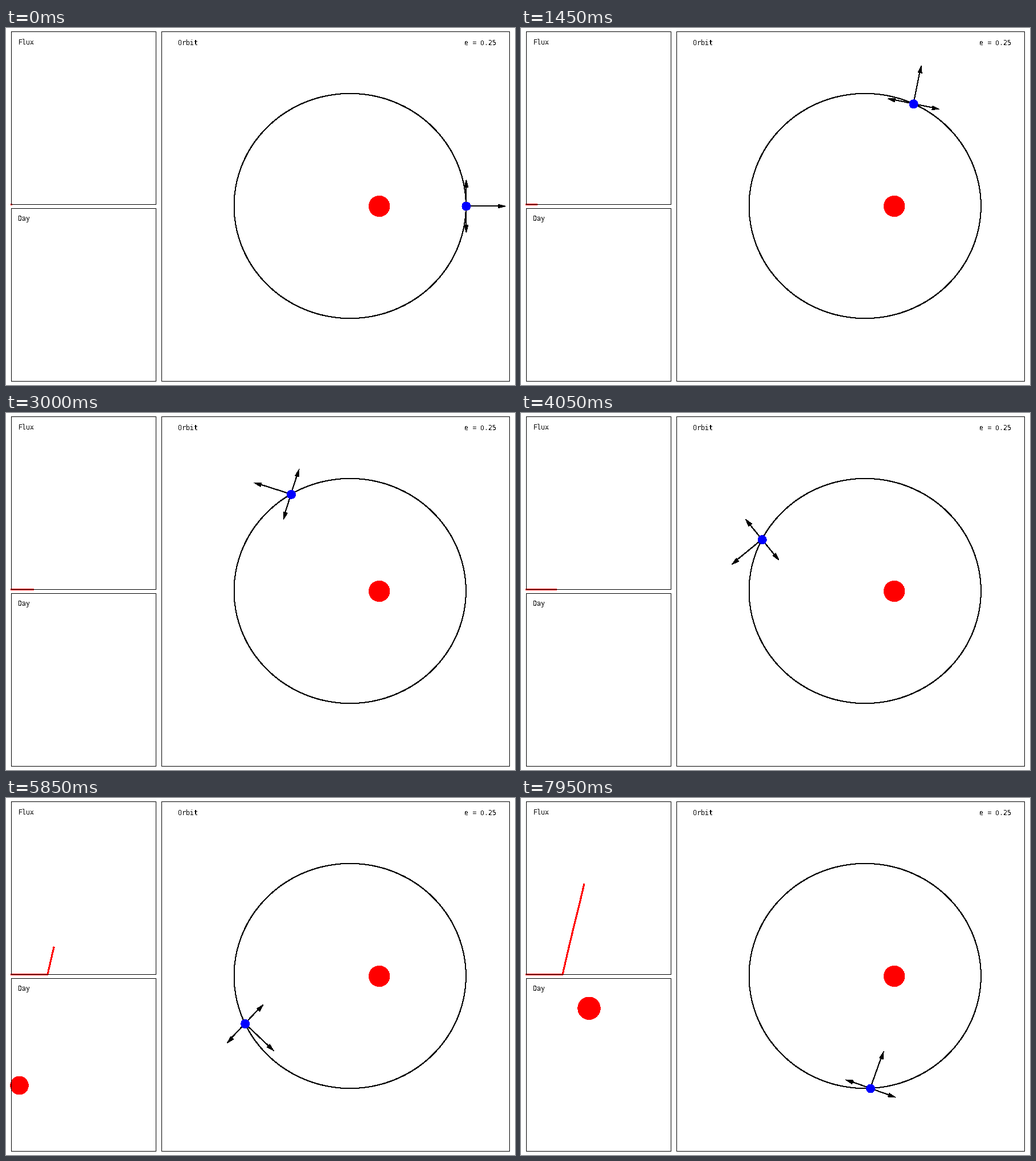
These frames come from a looping animation (894 by 626 pixels, 8 s). A matplotlib script:

```python
import numpy as np
import matplotlib.pyplot as plt
from matplotlib.animation import FuncAnimation
from matplotlib.patches import Circle, Polygon, Rectangle

W, H, DPI = 894, 626, 100
FRAMES, STEP_MS = 160, 50
PX = 72 / DPI                       # points per pixel

ECC = 0.25
RATE = 4 * np.pi / 399              # mean anomaly per frame
SPIN = 1.5                          # spin turns per orbit
A = 203.67                          # semi-major axis in pixels
B = A * np.sqrt(1 - ECC ** 2)
CX, CY = 604.7, 312.5
STAR_X = CX + A * ECC
LONG, SHORT = 0.34 * A, 0.23 * A
PEN = 0.5                           # two-pixel strokes sit up and left by this

FLUX_X, FLUX_Y, FLUX_STEP, FLUX_SCALE = 9.5, 309.5, 254 / 399, 156
DAY_X, DAY_Y, DAY_W, DAY_H = 136.5, 619.5, 127, 253

plt.rcParams["path.simplify"] = False
plt.rcParams["text.antialiased"] = False

fig = plt.figure(figsize=(W / DPI, H / DPI), dpi=DPI, facecolor="white")
ax = fig.add_axes([0, 0, 1, 1])
ax.set_xlim(0, W)
ax.set_ylim(H, 0)
ax.axis("off")


def panel(x0, y0, x1, y1):
    ax.add_patch(Rectangle((x0, y0), x1 - x0, y1 - y0, fill=False, ec="black",
                           lw=PX, aa=False, snap=True, zorder=8))


def label(x, base, text, family="DejaVu Sans Mono", size=11.63):
    ax.text(x, base, text, family=family, size=size * PX,
            va="baseline", zorder=9)


# Without antialiasing every touched pixel is painted, so strokes come out
# about one pixel wider and discs half a pixel larger than their nominal size.
def disc(x, y, r, color, z):
    return ax.add_patch(Circle((x, y), r - 0.5, fc=color, lw=0, aa=False,
                               zorder=z))


def line(color, width, z, **kw):
    return ax.plot([], [], color=color, lw=(width - 1) * PX, aa=False,
                   snap=False, zorder=z, **kw)[0]


class Arrow:
    def __init__(self):
        self.shaft = line("black", 2, 4)
        self.head = ax.add_patch(Polygon(np.zeros((3, 2)), fc="black", lw=0,
                                         aa=False, snap=False, zorder=4))

    def point(self, x, y, angle, length):
        u = np.array([np.cos(angle), -np.sin(angle)])
        n = np.array([-u[1], u[0]])
        start = np.array([x, y])
        tip = start + (length - 0.6) * u
        back = tip - 12.8 * u
        self.shaft.set_data(*(np.transpose([start, back]) - PEN))
        self.head.set_xy([tip, back + 3.4 * n, back - 3.4 * n])


def eccentric(mean):
    e = mean
    for _ in range(8):
        e = e - (e - ECC * np.sin(e) - mean) / (1 - ECC * np.cos(e))
    return e


def state(i):
    """Planet place, spin angle, distance and hour angle at step i."""
    mean = RATE * np.asarray(i, float)
    e = eccentric(mean)
    x, y = CX + A * np.cos(e), CY - B * np.sin(e)
    dist = 1 - ECC * np.cos(e)
    spin = SPIN * mean
    hour = np.arctan2(y - CY, STAR_X - x) - spin
    return x, y, spin, dist, hour


panel(9, 6, 263, 309)
panel(9, 316, 263, 619)
panel(273, 6, 884, 619)
label(21.5, 29, "Flux")
label(21.5, 338, "Day")
label(302.5, 30, "Orbit")
label(805, 30, "e =  .25")
label(833, 30, "0", "DejaVu Sans", 11.2)     # plain zero without a dot

turn = np.linspace(0, 2 * np.pi, 100)
line("black", 2, 2).set_data(CX - PEN + A * np.cos(turn),
                             CY - PEN - B * np.sin(turn))
disc(STAR_X, CY, 18.6, "red", 3)
planet = disc(0, 0, 7.9, "blue", 5)
arrows = [Arrow() for _ in range(3)]
curve = line("red", 3, 6, solid_capstyle="projecting")
sun = disc(0, 0, 1, "red", 6)

steps = np.arange(FRAMES)
_, _, _, dists, hours = state(steps)
flux_x = FLUX_X + FLUX_STEP * steps
flux_y = FLUX_Y - FLUX_SCALE * np.maximum(np.cos(hours), 0) / dists ** 2


def draw(i):
    x, y, spin, dist, hour = state(i)
    planet.center = x, y
    for arrow, turn_by, size in zip(arrows, (0, np.pi / 2, -np.pi / 2),
                                    (LONG, SHORT, SHORT)):
        arrow.point(x, y, spin + turn_by, size)

    curve.set_data(np.r_[FLUX_X - 0.1, flux_x[:i + 1]],
                   np.r_[FLUX_Y, flux_y[:i + 1]])

    height = np.cos(hour)
    sun.set_visible(bool(height > 0))
    sun.center = DAY_X - DAY_W * np.sin(hour), DAY_Y - DAY_H * height
    sun.set_radius(19.9 / dist - 0.5)
    return []


anim = FuncAnimation(fig, draw, frames=FRAMES, init_func=lambda: draw(0),
                     interval=STEP_MS, repeat=True, repeat_delay=0, blit=False)
plt.show()
```
